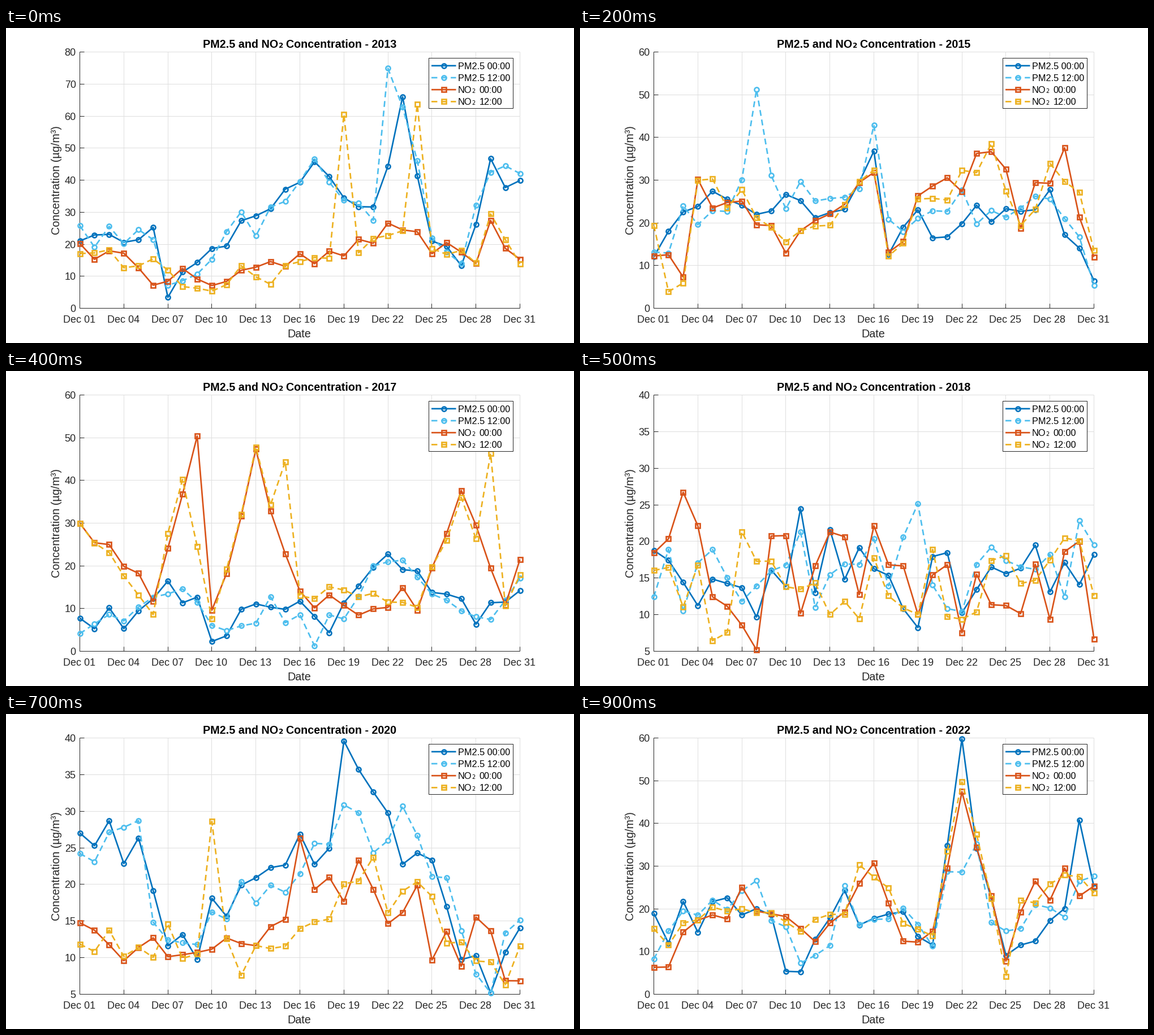
These frames come from a looping animation (1004x558 px, 1 s). A matplotlib script:

```python
import numpy as np
import matplotlib.pyplot as plt
from matplotlib.animation import FuncAnimation
from matplotlib.patches import Rectangle

W, H = 1004, 558
LEFT, RIGHT, TOP, BOTTOM = 130.5, 908.5, 42.5, 496.5
DAYS = 31
FIRST, LAST = 2013, 2022
INK, GRID = "#262626", "#dedede"
TICK, LABEL, SMALL = 18, 19.8, 16.2

# colour, marker, marker size, dashed
STYLES = [("#0072BD", "o", 8, False), ("#4DBEEE", "o", 8, True),
          ("#D95319", "s", 7.3, False), ("#EDB120", "s", 7.3, True)]
PM_0, PM_12, NO_0, NO_12 = range(4)

years = {}


def add_year(year, low, high, jitter, pm, no, peaks=()):
    """Daily readings: turning points (day, value) of each pollutant, plus
    seeded jitter for each hour and a few peaks (series, day, value)."""
    rng = np.random.default_rng(year)
    days = np.arange(1, DAYS + 1)
    trends = [np.interp(days, *zip(*points)) for points in (pm, pm, no, no)]
    series = np.array(trends) + rng.normal(0, jitter, (len(STYLES), DAYS))
    series = np.clip(series, low + 0.2, high - 0.5)
    for which, day, value in peaks:
        series[which, day - 1] = value
    years[year] = low, high, series


add_year(2013, 0, 80, 2.5,
         pm=[(1, 22), (6, 23), (7, 5), (17, 44), (21, 30), (23, 66), (25, 22), (27, 14),
             (29, 42), (31, 39)],
         no=[(1, 19), (10, 8), (18, 15), (22, 27), (28, 15), (29, 28), (31, 14)],
         peaks=[(NO_12, 19, 60.6), (NO_12, 24, 63.7), (PM_12, 22, 74.9)])
add_year(2014, 0, 60, 7, pm=[(1, 20), (31, 22)], no=[(1, 22), (31, 20)])
add_year(2015, 0, 60, 3,
         pm=[(1, 12), (4, 26), (13, 23), (16, 38), (17, 20), (28, 25), (31, 7)],
         no=[(1, 14), (3, 7), (4, 28), (12, 15), (16, 34), (17, 17), (24, 38), (26, 19),
             (29, 37), (31, 13)],
         peaks=[(PM_12, 8, 51.2)])
add_year(2016, 0, 60, 7, pm=[(1, 21), (31, 21)], no=[(1, 23), (31, 21)])
add_year(2017, 0, 60, 2,
         pm=[(1, 5), (8, 15), (10, 5), (15, 11), (17, 4), (22, 22), (28, 8), (31, 15)],
         no=[(1, 30), (6, 11), (8, 40), (10, 8), (13, 45), (16, 13), (24, 11), (27, 35),
             (30, 10), (31, 20)],
         peaks=[(NO_0, 9, 50.4), (NO_12, 15, 44.4), (NO_12, 29, 46.3)])
add_year(2018, 5, 40, 4.5, pm=[(1, 16), (31, 17)], no=[(1, 16), (31, 15)])
add_year(2019, 0, 50, 1.6,
         pm=[(1, 11), (7, 29), (10, 34), (12, 22), (20, 27), (23, 8), (29, 10), (31, 21)],
         no=[(1, 5), (4, 11), (7, 24), (10, 29), (12, 15), (18, 20), (24, 6), (31, 7)],
         peaks=[(PM_12, 19, 46.4), (NO_12, 19, 45.8), (NO_0, 20, 42.1), (PM_0, 11, 42.3)])
add_year(2020, 5, 40, 2.4,
         pm=[(1, 24), (5, 27), (7, 11), (13, 20), (22, 31), (29, 7), (31, 16)],
         no=[(1, 14), (7, 10), (14, 12), (19, 20), (24, 17), (27, 9), (31, 8)],
         peaks=[(NO_12, 10, 28.6), (NO_0, 16, 26.3), (PM_0, 19, 39.6)])
add_year(2021, 5, 30, 1.6,
         pm=[(1, 9), (5, 17), (8, 8), (9, 18), (12, 6), (16, 22), (18, 10), (21, 8),
             (24, 20), (31, 13)],
         no=[(1, 13), (8, 11), (9, 28), (12, 11), (21, 7), (24, 18), (29, 21), (31, 9)],
         peaks=[(NO_0, 2, 23.6), (PM_0, 5, 23.6), (NO_0, 24, 28.1), (PM_0, 29, 25)])
add_year(2022, 0, 60, 2.6,
         pm=[(1, 12), (7, 25), (11, 9), (14, 20), (20, 15), (22, 44), (25, 11), (31, 28)],
         no=[(1, 11), (7, 24), (12, 14), (16, 31), (18, 13), (20, 14), (22, 49), (25, 8),
             (27, 25), (31, 25)],
         peaks=[(PM_0, 22, 59.8), (PM_12, 22, 28.6), (PM_0, 30, 40.8)])

plt.rcParams["font.family"] = "Liberation Sans"
# At 72 dpi one point is one pixel.
fig = plt.figure(figsize=(W / 72, H / 72), dpi=72, facecolor="white")
ax = fig.add_axes([0, 0, 1, 1])
ax.set(xlim=(0, W), ylim=(H, 0))
ax.axis("off")


def crisp(v):
    return np.floor(v) + 0.5


def text(x, y, s, size, color=INK, z=2, **kw):
    return ax.text(x, y, s, fontsize=size, color=color, va="baseline", zorder=z, **kw)


def rule(xs, ys, color=INK, z=1.5):
    return ax.plot(xs, ys, color=color, lw=1, zorder=z, snap=False,
                   solid_capstyle="butt")[0]


def curve(style, xs, ys, z, **kw):
    color, marker, size, dashed = style
    line, = ax.plot(xs, ys, color=color, lw=2.67, marker=marker, ms=size,
                    mfc="none", mew=2.67, zorder=z, clip_on=False, snap=False,
                    solid_capstyle="butt", dash_capstyle="butt", **kw)
    if dashed:
        line.set_linestyle((0, (3.9, 2.5)))
    return line


def subscript(x, y, size, z, **kw):
    text(x, y, "2", size * 0.6, "black", z, family="DejaVu Sans", **kw)


days_x = np.linspace(LEFT, RIGHT, DAYS)

# Axes, date ticks and labels
for day in range(0, DAYS, 3):
    x = crisp(days_x[day])
    rule([x, x], [TOP, BOTTOM], GRID, 1)
    rule([x, x], [BOTTOM, BOTTOM - 8])
    text(x - 1.2, 522, f"Dec {day + 1:02d}", TICK, ha="center")
rule([LEFT, RIGHT], [BOTTOM, BOTTOM])
rule([LEFT, LEFT], [TOP, BOTTOM])
text(518.3, 548, "Date", LABEL, ha="center")
text(95, 270, "Concentration (µg/m³)", LABEL, ha="center",
     rotation=90, rotation_mode="anchor")

# Title
text(347.6, 35, "PM2.5 and NO", LABEL, "black", weight="bold")
subscript(481.6, 35, LABEL, 2, weight="bold")
title = text(495.1, 35, "", LABEL, "black", weight="bold")

# Value ticks, enough for the finest scale
ticks = [(rule([LEFT, RIGHT], [0, 0], GRID, 1), rule([LEFT, LEFT + 8], [0, 0]),
          text(123.7, 0, "", TICK, ha="right")) for _ in range(11)]

lines = [curve(s, days_x, days_x, 3 + i) for i, s in enumerate(STYLES)]

# Legend
ax.add_patch(Rectangle((747.5, 53.5), 149, 89, fc="white", ec=INK, lw=1,
                       zorder=8, snap=False))
for i, style in enumerate(STYLES):
    y = 66.8 + 21.2 * i
    base = round(y + 6)
    hour = "12:00" if style[3] else "00:00"
    curve(style, [752, 795.5], [y, y], 9, markevery=[])
    curve(style[:3] + (False,), [773.7], [y], 9)
    if i < NO_0:
        text(798.8, base, "PM2.5 " + hour, SMALL, "black", 9)
    else:
        text(798.8, base, "NO", SMALL, "black", 9)
        subscript(823.2, base, SMALL, 9)
        text(836.3, base, hour, SMALL, "black", 9)


def update(i):
    year = FIRST + i
    low, high, series = years[year]
    scale = (BOTTOM - TOP) / (high - low)
    step = 10 if high - low > 50 else 5
    title.set_text(f"Concentration - {year}")
    for k, (grid, mark, label) in enumerate(ticks):
        value = low + k * step
        shown = value <= high
        y = crisp(BOTTOM - k * step * scale)
        for part in (grid, mark):
            part.set_ydata([y, y])
            part.set_visible(shown and k > 0)
        label.set_text(str(value))
        label.set_y(y + 6.5)
        label.set_visible(shown)
    for line, values in zip(lines, series):
        line.set_ydata(BOTTOM - (values - low) * scale)
    return [title, *lines]


anim = FuncAnimation(fig, update, frames=LAST - FIRST + 1, interval=100,
                     repeat=True, repeat_delay=0, blit=False)
plt.show()
```
